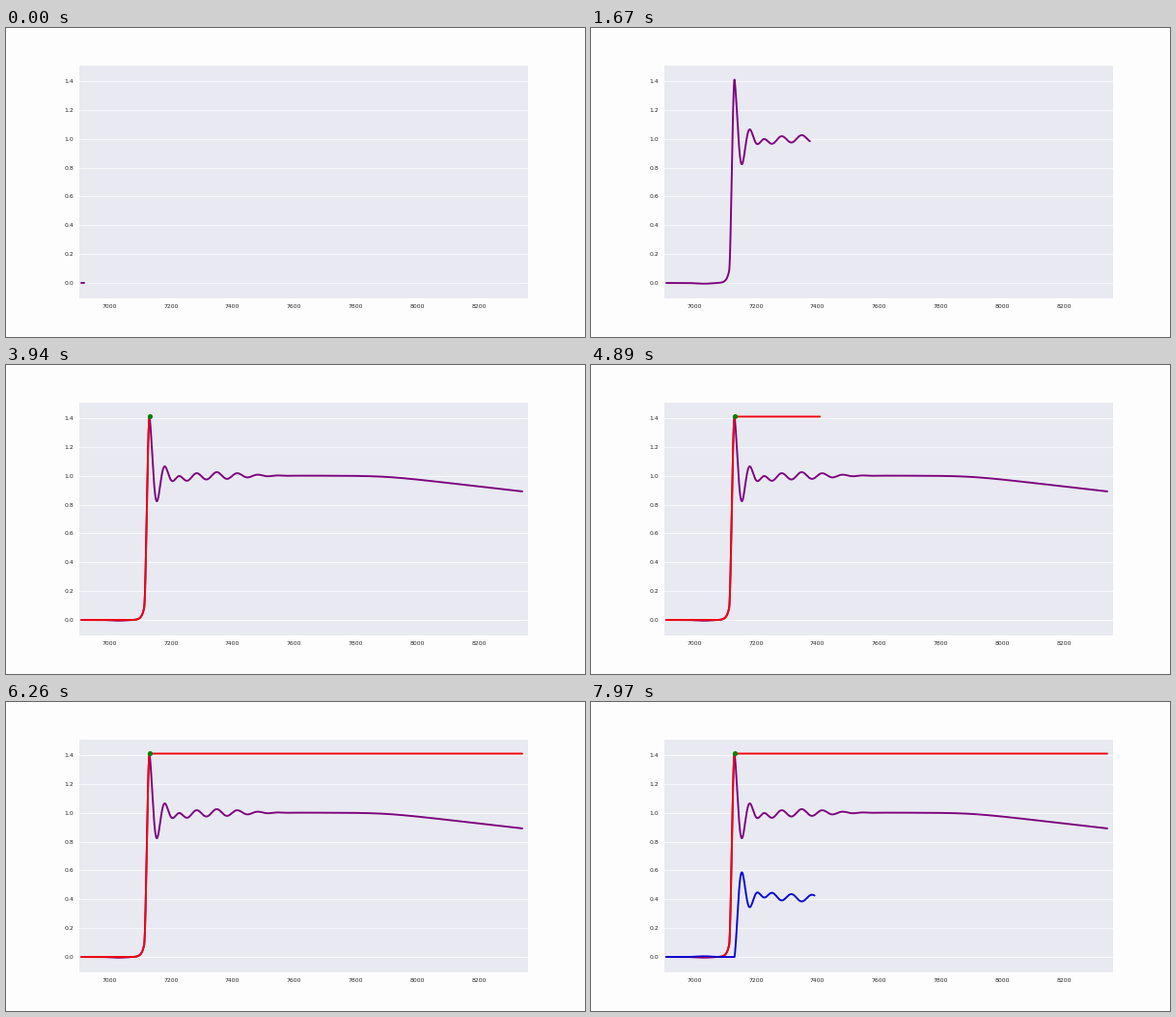
These frames come from a looping animation (600 by 320 pixels, 8000 ms). A matplotlib script:

```python
import numpy as np
import matplotlib.pyplot as plt
from matplotlib.animation import FuncAnimation

W, H, DPI = 600, 320, 100
FRAMES, INTERVAL = 200, 40
LEFT, RIGHT, TOP, BOTTOM = 76, 540.5, 39, 280
PX = 72 / DPI      # points per pixel
PASS = 3135        # ms between the starts of two lines
START, END = 78, 535
RISE, PEAK = 143, 148.7


def to_x(px):
    return 7000 + (px - 106.9) / 0.3193


def to_y(px):
    return (264.05 - px) / 149.4


def bell(x, mid, width):
    return np.exp(-((x - mid) / width) ** 2)


def response(c):
    """Step response over stage columns: toe, rise, ringing, slow droop."""
    u = np.clip((c - RISE) / (PEAK - RISE), 0, 1)
    toe = 0.08 * np.exp(np.minimum(c - RISE, 0) / 2.5)
    rise = toe + 1.33 * u * u * (3 - 2 * u) - 0.005 * bell(c, 117, 10)

    t = np.maximum(c - PEAK, 0)
    ring = 0.41 * np.exp(-t / 9.6) * np.cos(np.pi * t / 8.3)
    wave = 0.025 * bell(c, 214, 42) * np.cos(2 * np.pi * (c - 197) / 21.5)
    sag = 0.018 * bell(c, 182, 15)
    droop = 0.0115 * np.log1p(np.exp((c - 393) / 15))
    return np.where(c < PEAK, rise, 1 + ring + wave - sag - droop)


def head(age):
    """Column of a line's tip: steady at first, then speeding up."""
    return 81 + 0.089 * age + 9.5e-5 * max(age - 1640, 0) ** 2


cols = np.linspace(START, END, 3000)
xs = to_x(cols)
signal = response(cols)
high = np.maximum.accumulate(signal)

plt.rcParams["font.family"] = "DejaVu Sans"
fig = plt.figure(figsize=(W / DPI, H / DPI), dpi=DPI, facecolor="#fefdfe")
ax = fig.add_axes([LEFT / W, 1 - BOTTOM / H,
                   (RIGHT - LEFT) / W, (BOTTOM - TOP) / H])
ax.set_facecolor("#e8e9f1")
ax.set_xlim(to_x(LEFT), to_x(RIGHT))
ax.set_ylim(to_y(BOTTOM), to_y(TOP))
ax.set_xticks(range(7000, 8201, 200))
ax.set_yticks(np.arange(8) * 0.2)
ax.yaxis.set_major_formatter("{x:.1f}")
ax.tick_params(length=0, pad=6 * PX, labelsize=6.15 * PX,
               labelcolor="#262626")
ax.grid(axis="y", color="#f8f8fb", lw=PX)
ax.set_axisbelow(True)
ax.spines[:].set_visible(False)


def trace(color):
    return ax.plot([], [], color=color, lw=1.9 * PX,
                   solid_capstyle="round", solid_joinstyle="round")[0]


# Signal, its running maximum, and the drop below that maximum
traces = [(trace("#7d007d"), signal),
          (trace("#f2040c"), high),
          (trace("#0404d8"), high - signal)]
dot, = ax.plot([], [], "o", color="#088008", ms=5.2 * PX, mew=0, zorder=4)


def update(frame):
    shown = []
    for i, (line, data) in enumerate(traces):
        age = frame * INTERVAL - i * PASS
        n = int(np.searchsorted(cols, head(age))) if age >= 0 else 0
        line.set_data(xs[:n], data[:n])
        shown.append(n)
    n = shown[1]
    top = [int(np.argmax(signal[:n]))] if n else []
    dot.set_data(xs[top], signal[top])
    return [line for line, _ in traces] + [dot]


anim = FuncAnimation(fig, update, frames=FRAMES, interval=INTERVAL,
                     repeat=True, repeat_delay=0, blit=False)
plt.show()
```
